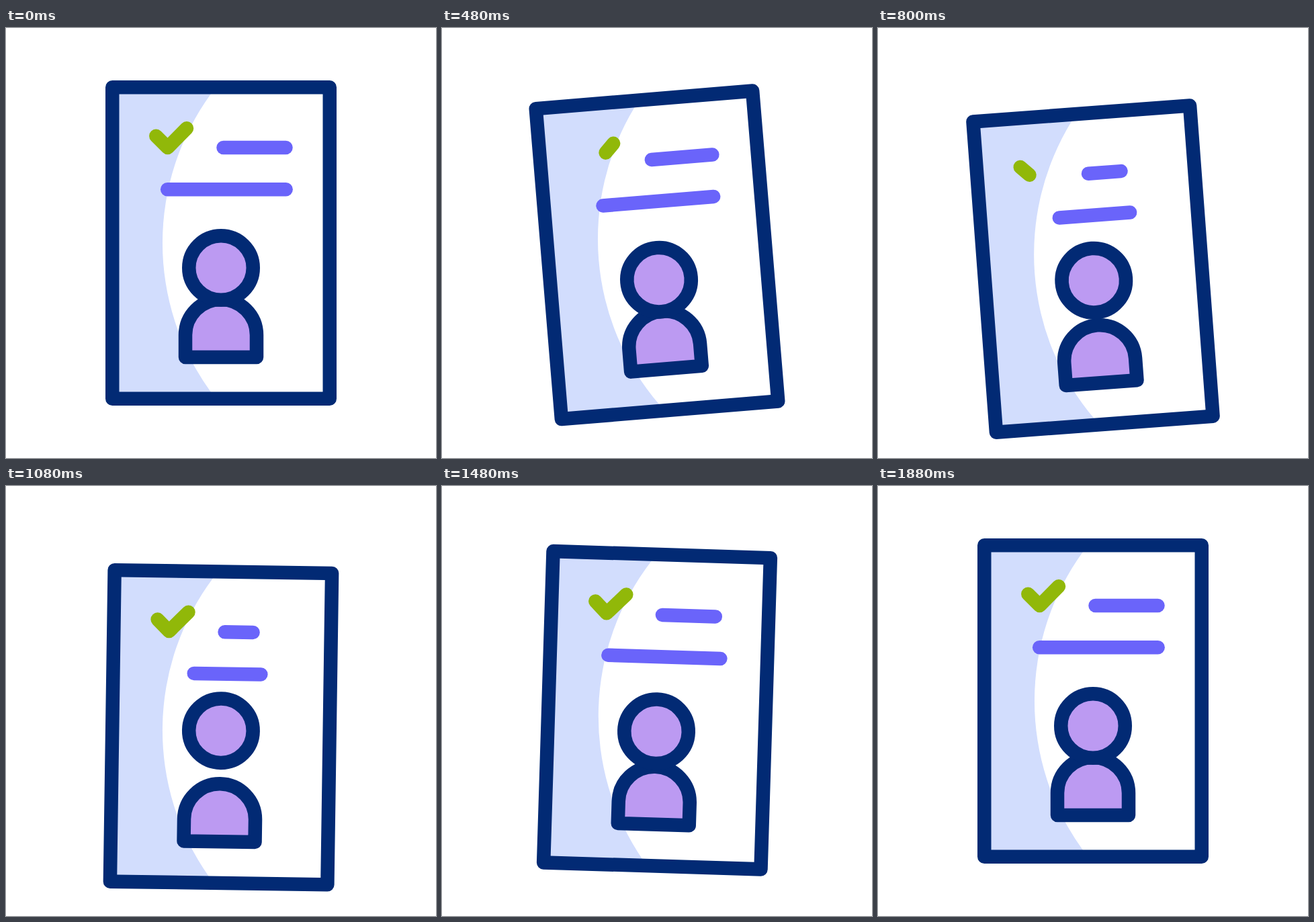
Animation, 640 px wide and 640 px high, one loop 1.96 s. Source, as an HTML page:

```html
<!DOCTYPE html>
<html lang="en">
<head>
<meta charset="utf-8">
<title>Approved profile</title>
<style>
html, body { margin: 0; width: 100%; height: 100%; overflow: hidden; background: #fff; }
svg { display: block; width: 100%; height: 100%; }
</style>
</head>
<body>
<svg viewBox="0 0 640 640" fill="none" stroke-width="20.5" stroke-linecap="round" stroke-linejoin="round">
  <g id="card">
    <path fill="#fff" d="M158 88H482V552H158Z"/>
    <path fill="#d2ddfd" d="M158 88H312L305 98A378 378 0 0 0 305 542L312 552H158Z"/>
    <path stroke="#022a74" d="M158.25 88.25H481.75V551.75H158.25Z"/>
    <path id="check" stroke="#91b809" pathLength="1" d="M223.3 160.7L240.6 178L269 149.2"/>
    <g stroke="#6a64fa">
      <path id="short"/>
      <path id="long"/>
    </g>
    <g fill="#bc9af2" stroke="#022a74">
      <path d="M267 490V457a53 53 0 0 1 106 0V490Z"/>
      <circle id="head" cx="320" r="47.75"/>
    </g>
  </g>
</svg>
<script>
const LOOP = 1960, STEP = 40;
const [card, check, short, long, head] =
  ["card", "check", "short", "long", "head"].map(id => document.getElementById(id));

const smooth = s => s * s * (3 - 2 * s);

// cubic-bezier(.6, 0, .4, 1), solved by bisection
function ease(x) {
  let lo = 0, hi = 1;
  for (let i = 0; i < 24; i++) {
    const s = (lo + hi) / 2, r = 1 - s;
    if (1.8 * s * r * r + 1.2 * s * s * r + s ** 3 < x) lo = s; else hi = s;
  }
  return smooth(lo);
}

// Value at time t along [time, value] keys
function track(t, keys, curve = ease) {
  if (t <= keys[0][0]) return keys[0][1];
  for (let i = 1; i < keys.length; i++) {
    const [t0, a] = keys[i - 1], [t1, b] = keys[i];
    if (t < t1) return a + (b - a) * curve((t - t0) / (t1 - t0));
  }
  return keys[keys.length - 1][1];
}

function draw(t) {
  const drop = track(t, [[40, 0], [960, 40], [1880, 0]]);
  const tilt = track(t, [[40, 0], [600, -5], [1320, 2], [1880, 0]]);
  card.setAttribute("transform", `translate(0 ${drop}) rotate(${tilt} 320 320)`);

  head.setAttribute("cy", track(t, [[560, 357], [1000, 324.5], [1720, 357]]));

  const shortLen = track(t, [[360, 93], [1000, 41.5], [1800, 93]]);
  short.setAttribute("d", `M323.5 178h${shortLen}`);

  const longLen = track(t, [[240, 176.5], [1000, 98.5], [1680, 176.5]]);
  long.setAttribute("d", `M${328.4 - longLen / 2} 240.3h${longLen}`);

  // The tick is wiped from its start, then drawn again
  const wipe = track(t, [[160, 0], [650, 1]], smooth);
  const from = t < 650 ? wipe : 0;
  const to = t < 650 ? 1 : track(t, [[650, 0], [1080, 1]], smooth);
  check.setAttribute("stroke-dasharray", `0 ${from} ${to - from} 2`);
  check.setAttribute("visibility", to - from > 0.001 ? "visible" : "hidden");
  if (to - from === 1) check.removeAttribute("stroke-dasharray");
  else if (from === 0) check.setAttribute("stroke-dasharray", `${to} 2`);
  else check.setAttribute("stroke-dasharray", `${to - from} 2`);
  check.setAttribute("stroke-dashoffset", from ? 2 + to - from - from : 0);
}

const start = performance.now();
function tick() {
  const t = (performance.now() - start) % LOOP;
  draw(Math.floor(t / STEP) * STEP);
  requestAnimationFrame(tick);
}
tick();
</script>
</body>
</html>
```
